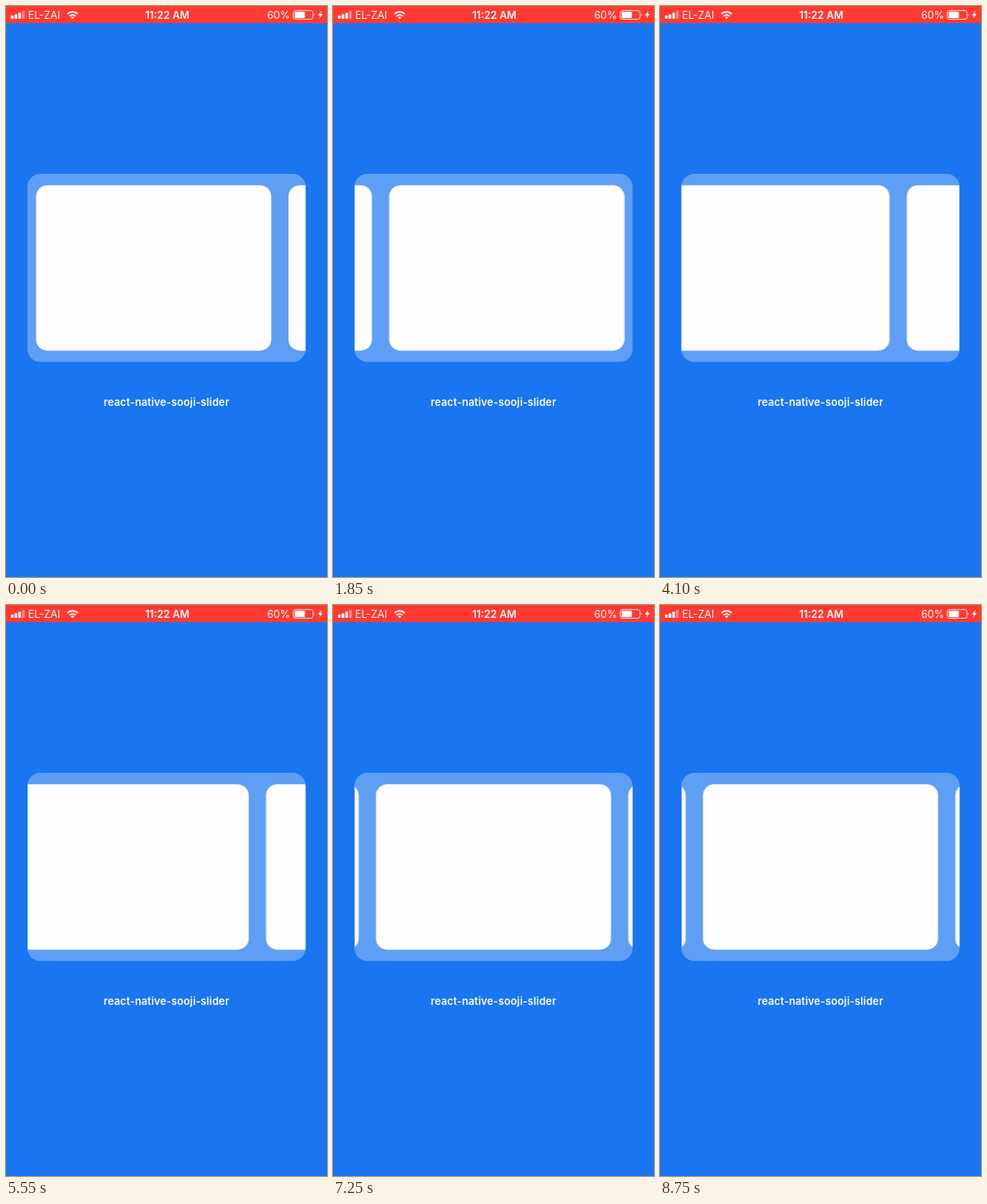
Animation, 400 px wide and 711 px high, one loop 8800 ms. Source, as an HTML page:

```html
<!DOCTYPE html>
<html lang="en">
<head>
<meta charset="utf-8">
<title>Slider demo</title>
<style>
  html, body { margin: 0; width: 100%; height: 100%; overflow: hidden; background: #1975f0; }
  svg { display: block; width: 100vw; height: 100vh; }
  text { font-family: Inter, "Liberation Sans", sans-serif; font-size: 12.8px; fill: #fff; }
  .bold { font-weight: 600; }
  .title { font-size: 13px; letter-spacing: .12px; }

  .track {
    --first: translateX(0);
    --middle: translateX(-298.5px);
    --last: translateX(-596.5px);
    --drag: cubic-bezier(.4, 0, .8, .6);
    --snap: cubic-bezier(.2, .5, .3, 1);
    animation: slide 8.8s linear infinite;
  }

  /* Each swipe is a short drag followed by a decelerating snap. */
  @keyframes slide {
    0%      { transform: var(--first); }
    6.818%  { transform: var(--first); animation-timing-function: var(--drag); }
    9.091%  { transform: translateX(-44px); animation-timing-function: var(--snap); }
    12.5%   { transform: var(--middle); }
    15.341% { transform: var(--middle); animation-timing-function: var(--drag); }
    17.614% { transform: translateX(-342.5px); animation-timing-function: var(--snap); }
    21.023% { transform: var(--last); }
    26.136% { transform: var(--last); animation-timing-function: var(--drag); }
    28.409% { transform: translateX(-552.5px); animation-timing-function: var(--snap); }
    31.25%  { transform: var(--middle); }
    33.523% { transform: var(--middle); animation-timing-function: var(--drag); }
    35.795% { transform: translateX(-254.5px); animation-timing-function: var(--snap); }
    38.636% { transform: var(--first); }
    44.318% { transform: var(--first); animation-timing-function: var(--drag); }
    46.591% { transform: translateX(-44px); animation-timing-function: var(--snap); }
    48.864% { transform: var(--middle); }
    /* Held drags around the middle card */
    51.136% { transform: var(--middle); animation-timing-function: ease-out; }
    52.841% { transform: translateX(-330px); }
    53.977% { transform: translateX(-330px); animation-timing-function: ease-in-out; }
    58.523% { transform: var(--middle); }
    59.659% { transform: var(--middle); animation-timing-function: ease-in-out; }
    63.068% { transform: translateX(-342.5px); }
    64.773% { transform: translateX(-342.5px); animation-timing-function: ease-in-out; }
    67.614% { transform: translateX(-285px); }
    68.75%  { transform: translateX(-285px); animation-timing-function: ease-in-out; }
    73.864% { transform: translateX(-340px); animation-timing-function: ease-in-out; }
    78.977% { transform: translateX(-320px); animation-timing-function: ease-out; }
    82.386% { transform: var(--middle); }
    86.364% { transform: var(--middle); animation-timing-function: var(--drag); }
    88.636% { transform: translateX(-254.5px); animation-timing-function: var(--snap); }
    91.477% { transform: var(--first); }
    94.886% { transform: var(--first); animation-timing-function: var(--drag); }
    97.159% { transform: translateX(-44px); animation-timing-function: var(--snap); }
    99.432%, 100% { transform: var(--middle); }
  }
</style>
</head>
<body>
<svg viewBox="0 0 400 711" preserveAspectRatio="none">
  <defs>
    <clipPath id="frame"><rect x="26.7" y="209" width="346.6" height="234.3" rx="16"/></clipPath>
    <rect id="card" x="37.5" y="223.2" width="293" height="206" rx="14" fill="#fffdff"/>
  </defs>
  <rect width="400" height="711" fill="#1975f0"/>

  <!-- Status bar -->
  <rect width="400" height="21.3" fill="#ff3a30"/>
  <g fill="#fff">
    <rect x="6.2" y="11.8" width="3.3" height="4.2" rx=".8"/>
    <rect x="10.8" y="10.2" width="3.3" height="5.8" rx=".8"/>
    <rect x="15.4" y="8.3" width="3.3" height="7.7" rx=".8"/>
    <rect x="20" y="6" width="3.3" height="10" rx=".8" opacity=".4"/>
  </g>
  <text x="27.5" y="15.6">EL-ZAI</text>
  <g fill="none" stroke="#fff" stroke-width="1.9">
    <path d="M76.6 10A8.8 8.8 0 0 1 89.4 10"/>
    <path d="M79.2 12.7A5.3 5.3 0 0 1 86.8 12.7"/>
  </g>
  <path d="M80.9 14.2A3 3 0 0 1 85.1 14.2L83 16.4Z" fill="#fff"/>
  <text class="bold" x="201" y="15.6" text-anchor="middle">11:22 AM</text>
  <text x="354" y="15.6" text-anchor="end">60%</text>
  <rect x="358" y="5.7" width="24.6" height="10.8" rx="2.8" fill="none" stroke="#fff" stroke-width=".9"/>
  <rect x="359.7" y="7.3" width="12.8" height="7.6" rx="1.2" fill="#fff"/>
  <path d="M383.8 9.2Q385.6 11 383.8 12.9Z" fill="#fff"/>
  <path d="M393 6L388.7 11.7H391.2L390.2 15.8L394.7 9.9H392.1Z" fill="#fff"/>

  <!-- Slider -->
  <g clip-path="url(#frame)">
    <rect x="26" y="208" width="348" height="236" fill="#5f9ef5"/>
    <g class="track">
      <use href="#card"/>
      <use href="#card" x="314.5"/>
      <use href="#card" x="629"/>
    </g>
  </g>
  <text class="bold title" x="200" y="498.3" text-anchor="middle">react-native-sooji-slider</text>
</svg>
</body>
</html>
```
